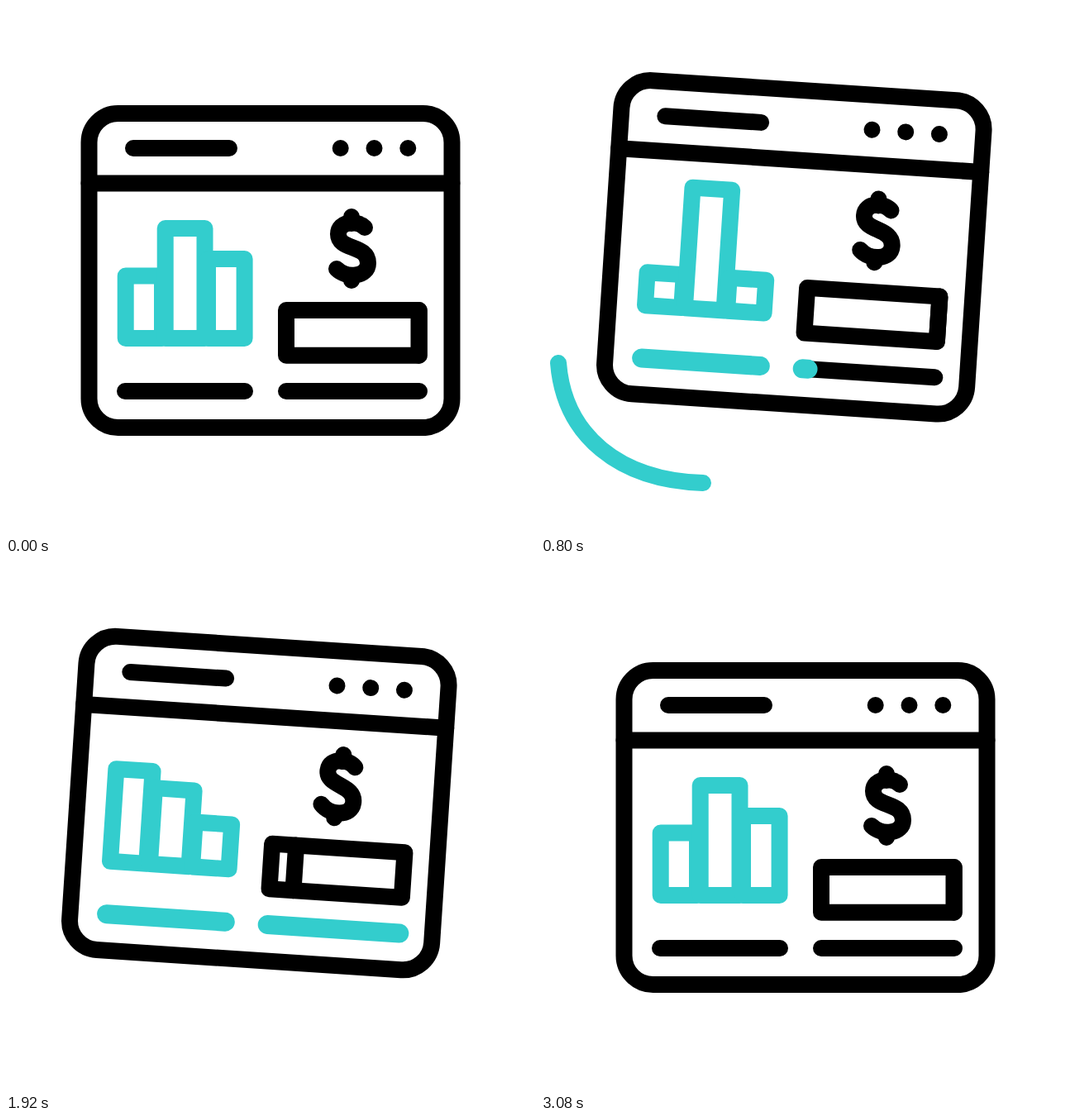
These frames come from a looping animation (640 by 640 pixels, 3600 ms). An HTML page:

```html
<!DOCTYPE html>
<html lang="en">
<head>
<meta charset="utf-8">
<title>Dashboard window</title>
<style>
html, body { margin: 0; width: 100%; height: 100%; overflow: hidden; background: #fff; }
svg { display: block; width: 100%; height: 100%; }
.ink, .teal { fill: none; stroke: #000; stroke-width: 20; stroke-linecap: round; stroke-linejoin: round; }
.teal { stroke: #33cdcd; }
.fill { stroke-width: 23; }
</style>
</head>
<body>
<svg viewBox="0 0 640 640">
  <path id="arcL" class="teal" pathLength="1" d="M21 432C28 520 95 574 196 577"/>
  <path id="arcR" class="teal" pathLength="1" d="M614 457C606 530 512 617 431 576"/>
  <g id="win">
    <rect class="ink" x="100.5" y="130" width="439" height="380" rx="35"/>
    <path class="ink" d="M100.5 214.5H539.5M154 172H270"/>
    <path class="ink" stroke-width="20.6" d="M404.7 172h0m40.8 0h0m40.8 0h0"/>
    <path id="dots" class="teal" d="M404.7 172h0m40.8 0h0m40.8 0h0"/>
    <g id="bars" class="teal">
      <rect x="144.7" width="44.3"/>
      <rect x="192.7" width="47.8"/>
      <rect x="244" width="44.6"/>
    </g>
    <g id="dollar" class="ink">
      <path d="M434 268C425 259 402 260 402 276C402 296 438 288 438 311C438 328 412 330 400 318"/>
      <path d="M418 255V263M418 326V332"/>
    </g>
    <rect class="ink" x="339" y="368" width="160.7" height="54.7"/>
    <path id="slider" class="ink" d="M499.7 368V422.7"/>
    <path class="ink" d="M144 466H289M339 466H500"/>
    <path id="lineL" class="teal fill" pathLength="1" d="M144.5 466H288.5"/>
    <path id="lineR" class="teal fill" pathLength="1" d="M339.5 466H499.5"/>
  </g>
</svg>
<script>
const LOOP = 3600, LEAD = 80, STEP = 20, LAST = 150;
const $ = id => document.getElementById(id);
const clamp = (v, lo, hi) => Math.min(hi, Math.max(lo, v));
const bars = [...$('bars').children];

// Bar heights: at rest, with a tall middle, and as falling stairs.
const rest = [75.5, 133, 96], tall = [40, 146, 40], stairs = [112, 92, 54];

let k = 0;

function ease(from, to) {
  const p = clamp((k - from) / (to - from), 0, 1);
  return p * p * (3 - 2 * p);
}

// Rises from 0 to 1 between a and b, falls back between c and d.
const pulse = (a, b, c, d) => ease(a, b) - ease(c, d);

function tilt() {
  const swing = clamp(k, 34, 118) - 34;
  return (4.45 * Math.cos(Math.PI * swing / 28) - 0.58) * pulse(8, 34, 118, 150);
}

function lift() {
  const hops = 53 * pulse(0, 20, 20, 53) + 51 * pulse(53, 73.5, 73.5, 112);
  return -hops - 2 * pulse(53, 73.5, 112, 150);
}

function trim(id, from, to) {
  const el = $(id), len = to - from;
  el.style.display = len > 0.001 ? '' : 'none';
  el.setAttribute('stroke-dasharray', `${len} 2`);
  el.setAttribute('stroke-dashoffset', -from);
}

function move(id, transform) {
  $(id).setAttribute('transform', transform);
}

function draw(ms) {
  k = clamp(Math.floor((ms % LOOP - LEAD) / STEP), 0, LAST);

  move('win', `translate(0 ${lift()}) rotate(${tilt()} 320 111)`);

  const toTall = pulse(10, 34, 40, 64), toStairs = pulse(40, 64, 96, 142);
  bars.forEach((bar, i) => {
    const h = rest[i] + (tall[i] - rest[i]) * toTall + (stairs[i] - rest[i]) * toStairs;
    bar.setAttribute('y', 402 - h);
    bar.setAttribute('height', h);
  });

  move('dollar', `rotate(${4.5 * toStairs} 418 255)`);
  move('slider', `translate(${-160.7 * pulse(58.5, 76, 76, 135)} 0)`);
  $('dots').style.strokeWidth = 23.4 * pulse(50, 58, 76, 84);

  trim('lineL', 0, pulse(7, 31, 111, 139));
  trim('lineR', 0, pulse(33, 57, 118, 146));
  trim('arcL', ease(36, 52), ease(16, 36));
  trim('arcR', ease(67, 83), ease(54, 67));
}

const start = performance.now();
function tick() {
  draw(performance.now() - start);
  requestAnimationFrame(tick);
}
tick();
</script>
</body>
</html>
```
